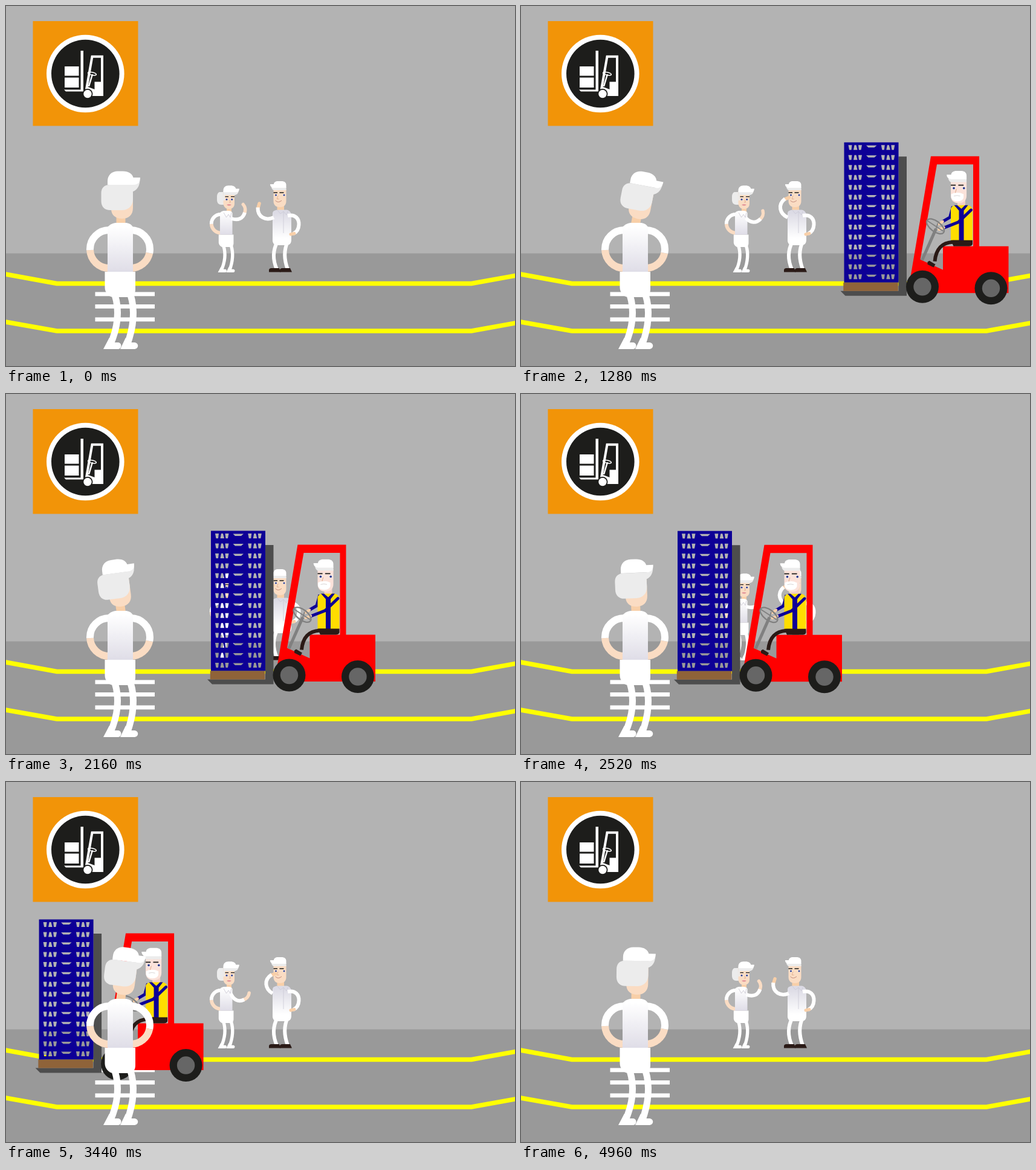
Recreate the animation shown at these times as an HTML page with a canvas. Size 842 by 596 pixels, loop 5000 ms.

```html
<!DOCTYPE html>
<html lang="en">
<head>
<meta charset="utf-8">
<title>Forklift crossing</title>
<style>
html, body { margin: 0; width: 100%; height: 100%; overflow: hidden; background: #b3b3b3; }
canvas { display: block; }
</style>
</head>
<body>
<canvas id="stage" width="842" height="596"></canvas>
<script>
const ctx = document.getElementById('stage').getContext('2d');
const LOOP = 5000, STEP = 40;
const WHITE = '#fff', BLACK = '#1d1d1b', SKIN = '#fadcc3', NECK = '#f8cfa8', PALE = '#ececec';
const YELLOW = '#ff0', RED = '#f00', NAVY = '#0d0096', GREY = '#808080', MAST = '#4d4d4d';

const CAP = 'M168 296V290C168 280 175 273.5 185 273.5H193C203 273.5 209 278 210.5 284H222C222 291 219 296 211 296Z';

// Piecewise linear track of [time, value] keys
function track(keys, t) {
  for (let i = 1; i < keys.length; i++) {
    const [t0, a] = keys[i - 1], [t1, b] = keys[i];
    if (t <= t1) return a + (b - a) * (t - t0) / (t1 - t0);
  }
  return keys[keys.length - 1][1];
}

const nodKeys = [[0, 0], [800, 17.3], [1060, 17.3], [2000, -10], [2700, 0], [3100, 0], [3900, 17.3], [4000, 17.3], [5000, 0]];
const womanWave = [[0, 0], [800, 75], [1550, 0], [2600, 0], [4000, 80], [5000, 0]];
const manWave = [[0, 0], [640, 55], [1280, 50], [2920, 44], [4000, 68], [5000, 0]];
const truckX = [[0, 848], [600, 685.2], [1280, 534.5], [5000, -292]];
const truckY = [[0, 217.5], [600, 224.6], [1280, 225.8], [4000, 228], [5000, 213]];

function fill(d, color, rule = 'nonzero') {
  ctx.fillStyle = color;
  ctx.fill(new Path2D(d), rule);
}

function line(d, color, width, cap = 'butt') {
  ctx.strokeStyle = color;
  ctx.lineWidth = width;
  ctx.lineCap = cap;
  ctx.stroke(new Path2D(d));
}

function rect(x, y, w, h, color) {
  ctx.fillStyle = color;
  ctx.fillRect(x, y, w, h);
}

function disc(x, y, r, color) {
  ctx.fillStyle = color;
  ctx.beginPath();
  ctx.arc(x, y, r, 0, 2 * Math.PI);
  ctx.fill();
}

function ring(x, y, rx, ry, tilt, color, width) {
  ctx.strokeStyle = color;
  ctx.lineWidth = width;
  ctx.beginPath();
  ctx.ellipse(x, y, rx, ry, tilt, 0, 2 * Math.PI);
  ctx.stroke();
}

function placed(x, y, scale, draw) {
  ctx.save();
  ctx.translate(x, y);
  ctx.scale(scale, scale);
  draw();
  ctx.restore();
}

function turned(x, y, degrees, draw) {
  ctx.save();
  ctx.translate(x, y);
  ctx.rotate(degrees * Math.PI / 180);
  ctx.translate(-x, -y);
  draw();
  ctx.restore();
}

function fade(y0, y1, from, to) {
  const g = ctx.createLinearGradient(0, y0, 0, y1);
  g.addColorStop(0, from);
  g.addColorStop(1, to);
  return g;
}

function drawRoom() {
  rect(0, 0, 842, 596, '#b3b3b3');
  rect(0, 409.5, 842, 187, '#999');
  line('M-5 443.2L84 459.5H770L847 445.6', YELLOW, 7.5);
  line('M-5 522.2L84 538H770L847 524.1', YELLOW, 7.5);
  for (const y of [473.5, 494, 515.5]) rect(147.5, y, 98.5, 6.8, WHITE);
}

function drawSign() {
  rect(44.5, 25, 174, 173.5, '#f29408');
  disc(131.3, 112, 64.3, WHITE);
  disc(131.3, 112, 56.3, BLACK);
  rect(97, 100, 23.5, 15.5, WHITE);
  rect(97, 118.5, 23.5, 16.5, WHITE);
  fill('M123.5 74H128V141.5H99L96 138.5H123.5Z', WHITE);
  line('M133 138L142.5 83.7H159V130', WHITE, 4);
  fill('M146.5 125.5H161V149H142L132 137L136 134L146.5 138Z', WHITE);
  line('M143 113L137 133', WHITE, 2.5);
  ring(142.5, 112, 7, 2.3, 0.2, WHITE, 1.6);
  disc(135, 145.5, 8.5, BLACK);
  disc(135, 145.5, 6.7, WHITE);
}

function arm(x, side) {
  const seam = side < 0 ? Math.PI * 0.985 : Math.PI * 0.065;
  const part = (from, to, color, ccw) => {
    ctx.strokeStyle = color;
    ctx.lineWidth = 12;
    ctx.lineCap = 'butt';
    ctx.beginPath();
    ctx.arc(x, 402.5, 31.5, from, to, ccw);
    ctx.stroke();
  };
  part(seam, Math.PI / 2, SKIN, side < 0);
  part(-Math.PI / 2, seam, WHITE, side < 0);
}

function body(bothArms) {
  arm(170.5, -1);
  if (bothArms) arm(206.5, 1);
  line('M180 478C189 507 184 535 172 562', WHITE, 11);
  line('M206 478C215 507 210 535 200 562', WHITE, 11);
  fill('M161 568L171 549L177 557H186C192 558 192 567 186 568Z', WHITE);
  fill('M189 568L198 549L204 557H213C220 558 220 567 213 568Z', WHITE);
  fill('M163.5 440H214V469C214 478 209 482 203 482H178C170 482 163.5 474 163.5 466Z', WHITE);
  fill('M168 440V366C173 361 177 359 183 359H197C203 359 207 361 210 366V440Z', fade(365, 440, WHITE, '#dfdde7'));
}

function drawWatcher(nod) {
  turned(190, 358, nod, () => {
    rect(182.5, 343, 15, 19, NECK);
    fill('M210 304V334C210 346 203 352 192 352C181 352 174 346 174 336Z', SKIN);
    fill('M171 296H219.5C217 303 213 306 210 307V320C210 331 202 338 192 338H172C164 338 157.5 333 157.5 323V310C157.5 301 163 296 171 296Z', PALE);
    fill('M211 296L221.5 288C221 297 218 304 210 307Z', PALE);
    fill(CAP, WHITE);
  });
  body(true);
}

function face(leftEye, rightEye, y) {
  for (const x of [leftEye, rightEye]) {
    disc(x, y, 2, WHITE);
    disc(x, y, 1.5, '#2d3a8c');
  }
}

function drawWoman(wave) {
  const k = 0.488;
  rect(365, 332, 8, 10, NECK);
  placed(354 - 168 * k, 441 - 568 * k, k, () => body(false));
  line('M360 342L364.5 350L368 345L371 350L373 342', '#c9c7d2', 0.8);
  fill('M359.5 308H353C350.5 309 349 312 349 315V321C349 326 352 329 356 329H361Z', PALE);
  fill('M359.5 308H378V327C378 333 374 336 369 336C363 336 359.5 332 359.5 326Z', SKIN);
  fill('M359.5 306H385C384 311 381 313 378 313H362V322H359.5Z', PALE);
  placed(359.5 - 168 * k, 441 - 568 * k, k, () => fill(CAP, WHITE));
  line('M362.5 315.7H368M372 315.7H378', BLACK, 1.3);
  face(365, 373.7, 320.3);
  line('M370 321L371.5 325H369', '#d9a07d', 0.7);
  fill('M365 329Q368.5 327.5 373 329Q369 332 365 329Z', '#e08a94');
  turned(374, 350, wave, () => {
    line('M393.5 345C397.5 338 395.5 332 392.3 328.5', SKIN, 5.5, 'round');
    line('M373 352C384 355.5 392 352 395 342', WHITE, 6);
  });
}

function cappedHead(skin, bearded) {
  fill('M5.5 13H26.5V33C26.5 40 22 43 16 43C10 43 5.5 40 5.5 33Z', skin);
  fill('M2 10H26.5V15H5.5C3.5 14 2.5 12 2 10Z', PALE);
  fill('M26.5 11V6C26.5 2 23 0 19 0H13C9 0 6 2 6 5H0C0 9 3 11 6 11Z', WHITE);
  line('M5.5 19H12M15.5 19H22.5', BLACK, 1.5);
  face(9.5, 23, 23);
  line('M13 24L11.3 29.5H14.5', '#d9a07d', 0.7);
  if (bearded) {
    fill('M6 31Q14 27 22.5 31V35C22 42.5 7 42.5 6 35Z', WHITE);
    line('M9.5 33.5Q14 32 18 33.5', '#d8d3d3', 0.8);
  } else line('M8.5 32Q13 37 19 32', '#b5776a', 0.8);
}

function drawMan(wave) {
  line('M449 390C441 405 441 420 448 436', WHITE, 6);
  line('M466 390C459 405 460 420 466 436', WHITE, 6);
  fill('M435 440.5V437C435 435 437 434 439 434H452L454.5 440.5Z', '#2a1a16');
  fill('M453 440.5V437C453 435 455 434 457 434H470L473 440.5Z', '#2a1a16');
  rect(448.5, 329, 11.5, 11, NECK);
  fill('M441 343C441 340 444 338 449 337.5H464C469 338 472 342 472 347V387C472 393 469 396 464 396H449C444 396 441 393 441 388Z', fade(342, 385, '#dcdbe5', WHITE));
  line('M459 340V376M449 338L454 344L459 340L464 346L466 340', '#cbc9d6', 0.8);
  line('M466 347C479 344 485 353 484.5 362C484 371 480 375 475 377', WHITE, 6);
  line('M477 376.5L471 378', NECK, 5, 'round');
  placed(437, 290, 1, () => cappedHead(SKIN, false));
  turned(442, 348, wave, () => {
    line('M416.8 335L419 327', NECK, 5.5, 'round');
    line('M443 350C430 356 416 350 416.5 333.5', WHITE, 6);
  });
}

// Crates are see-through: every vent is cut out of the stack
function cratePath() {
  let d = 'M0 0H90V232H0Z';
  for (let row = 0; row < 14; row++) {
    const y = 4.5 + row * 16.46;
    for (const x of [7, 61.3]) {
      d += `M${x} ${y}h6l-1 8h-3.5Z`;
      d += `M${x + 10} ${y}h3l2 8h-6.5Z`;
      d += `M${x + 16.5} ${y}h6l-1.5 8h-3.5Z`;
    }
    d += `M36.5 ${y + 0.5}h17.5l-4 3.5h-10Z`;
  }
  return d;
}
const crates = cratePath();

function wheel(x, y) {
  disc(x, y, 27, BLACK);
  disc(x, y, 14.7, '#666');
}

function drawDriver() {
  rect(187.5, 94, 13, 17, '#f3cfc6');
  placed(169.7, 47.3, 1.24, () => cappedHead('#fbe2da', true));
  line('M180 106L175 124L163 131', NAVY, 5);
  fill('M176.5 110C178 105 182 104 187 104H203C209 104 212.5 108 212.5 114V163H176.5Z', '#fd0');
  fill('M182 104H187L194 110L200 104H205L198 113V164H190V113Z', NAVY);
  fill('M176.5 162H212.5V168C212 171 209 172 206 172H181Z', '#2a1a16');
  line('M194 165H180C162 166 152 176 150 197', '#2a1a16', 6);
  fill('M138 198L141 196L151 202L148 207L138 202Z', '#2a1a16');
  line('M210 112L189 132L166 141', NAVY, 5, 'round');
  line('M163 131L157 135M165 141L157 144', NECK, 4.5, 'round');
}

function drawTruck(x, y) {
  placed(x, y, 1, () => {
    fill('M-6 246H90V23.5H103.5V254H2Z', MAST);
    // The stack is open to the room, so the mast stays to its right
    rect(-1.2, 232, 90.5, 14, '#8f6339');
    fill(crates, NAVY, 'evenodd');
    fill('M143.5 23H223.5V172H272V249.5H150L110 222Z' +
         'M153.5 36.5L126 194L163.5 211V172H213.5V36.5Z', RED, 'evenodd');
    line('M129 195L152 143', GREY, 5);
    drawDriver();
    ring(151, 139, 17, 8.5, 0.65, GREY, 2.3);
    line('M138 130L164 147M152 143L155 134', GREY, 1.8);
    wheel(129.5, 239);
    wheel(243, 241.5);
  });
}

function draw(t) {
  drawRoom();
  drawSign();
  drawWoman(track(womanWave, t));
  drawMan(track(manWave, t));
  drawTruck(track(truckX, t), track(truckY, t));
  drawWatcher(track(nodKeys, t));
}

const start = performance.now();
function tick() {
  const t = (performance.now() - start) % LOOP;
  draw(Math.floor(t / STEP) * STEP);
  requestAnimationFrame(tick);
}
tick();
</script>
</body>
</html>
```
